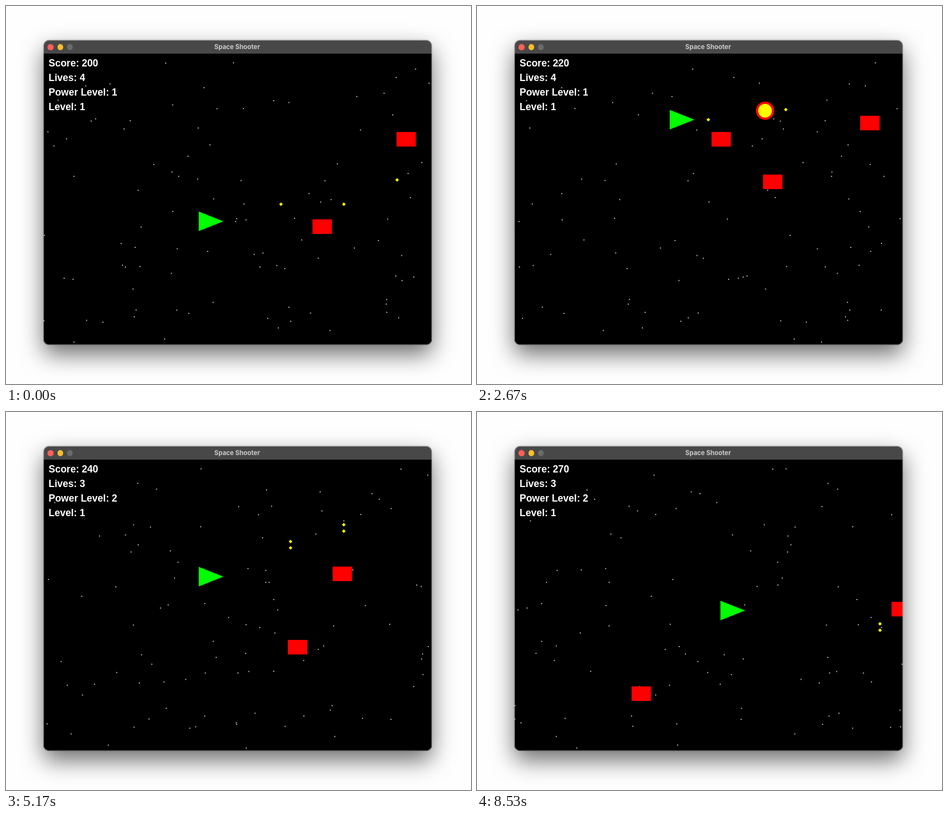
Recreate the animation shown at these times as an HTML page with a canvas. Size 830 by 675 pixels, loop 8.57 s.

```html
<!DOCTYPE html>
<html lang="en">
<head>
<meta charset="utf-8">
<title>Space Shooter</title>
<style>
  html, body { margin: 0; width: 100%; height: 100%; overflow: hidden; background: #fefefe; }
  #win {
    position: absolute; left: 67px; top: 61px; width: 693px; height: 544px;
    border-radius: 10px; background: #484848;
    box-shadow: 0 17px 40px rgba(0, 0, 0, .57), 0 0 2px rgba(0, 0, 0, .5);
  }
  #win::after {
    content: ""; position: absolute; inset: 0;
    border: 1px solid rgba(255, 255, 255, .3); border-radius: 10px;
  }
  #title {
    position: absolute; left: 0; width: 691px; top: 0;
    text-align: center; color: #c9c9c9; font: 700 11.4px/24px Inter, sans-serif;
  }
  i { position: absolute; top: 7px; width: 10.5px; height: 10.5px; border-radius: 50%; }
  canvas { position: absolute; left: 0; top: 24px; border-radius: 0 0 10px 10px; background: #000; }
</style>
</head>
<body>
<div id="win">
  <i style="left:7.3px;background:#ff5f57"></i>
  <i style="left:24.6px;background:#febc2e"></i>
  <i style="left:41.9px;background:#6b6b6b"></i>
  <div id="title">Space Shooter</div>
  <canvas width="693" height="520"></canvas>
</div>
<script>
const ctx = document.querySelector('canvas').getContext('2d');
const LOOP = 8570, LEFT = 67.5, WIDTH = 692, RIGHT = 759;
const SHIP_SPEED = 260, SHOT_SPEED = 522, DROP_SPEED = 153;
const SHIP_LENGTH = 44, ENEMY_W = 34.6, ENEMY_H = 26;
const CRASH = 2.96; // the ship rams an enemy

let seed = 7;
function rand(a, b) {
  seed = (seed * 16807) % 2147483647;
  return a + (b - a) * seed / 2147483647;
}
const stars = Array.from({ length: 97 }, () => ({
  x: rand(0, WIDTH), y: rand(100, 602), speed: rand(52, 154)
}));

// The ship sets off at a given time towards a target, at constant speed
const glide = (from, moves) => t => moves.reduce((pos, [begin, target]) => {
  const reach = SHIP_SPEED * Math.max(0, t - begin);
  return pos + Math.max(-reach, Math.min(reach, target - pos));
}, from);
const shipX = glide(344, [[6.567, 434.5]]);
const shipY = glide(310.5, [
  [-.594, 354], [-.117, 419], [.705, 345.5], [1.4, 185], [2.4, 203], [2.75, 314],
  [3.4, 207], [4.822, 294], [5.8, 289], [7.2, 384], [8.3, 354.5]
]);

// Enemies enter at the right edge: time, top, speed
const enemies = [
  [-1.927, 381, 110], [-.594, 225, 104.4], [.408, 301, 110], [1.08, 174, 206],
  [2.306, 196, 208], [3.362, 407, 141.8], [4.264, 276, 195], [5.2, 277, 170],
  [5.38, 490, 153.2], [6.9, 371, 150], [8.406, 339, 150]
].map(([begin, top, speed]) => ({
  top, end: Infinity, left: t => RIGHT - speed * (t - begin), speed
}));
const rammed = enemies[1], dropper = enemies[4];
rammed.end = CRASH;

// Shots leave the ship's nose and end at the first enemy in their way
const shots = [
  -.594, -.412, -.197, .05, .703, .869, 1.051, 2.144, 2.354, 2.619,
  3.18, 4.755, 4.937, 5.2, 5.7, 5.99, 6.304, 7.6, 8.072
].map(begin => {
  const x = shipX(begin) + SHIP_LENGTH, y = shipY(begin);
  const shot = { begin, x, y, end: Infinity };
  let hit;
  for (const e of enemies) {
    const gap = e.left(begin) - x, time = begin + gap / (SHOT_SPEED + e.speed);
    const inRow = y > e.top && y < e.top + ENEMY_H;
    if (inRow && gap > 0 && e.left(time) < RIGHT && time < Math.min(e.end, shot.end)) {
      hit = e;
      shot.end = time;
    }
  }
  if (hit) hit.end = shot.end;
  return shot;
});

const dropX = t => dropper.left(dropper.end) - DROP_SPEED * (t - dropper.end);
const POWER_UP = dropper.end + (dropX(dropper.end) - shipX(0) - SHIP_LENGTH) / DROP_SPEED;

function rect(color, x, y, w, h) {
  ctx.fillStyle = color;
  ctx.fillRect(x, y, w, h);
}

function poly(color, ...points) {
  ctx.fillStyle = color;
  ctx.beginPath();
  points.forEach(p => ctx.lineTo(...p));
  ctx.fill();
}

function disc(color, x, y, r) {
  ctx.fillStyle = color;
  ctx.beginPath();
  ctx.arc(x, y, r, 0, 7);
  ctx.fill();
}

const diamond = (x, y, r = 3.2) => poly('#ff0', [x - r, y], [x, y - r], [x + r, y], [x, y + r]);

function explosion(e, age) {
  const r = age * 52;
  if (r > 26) return;
  const x = e.left(e.end) + ENEMY_W / 2, y = e.top + ENEMY_H / 2;
  disc('#f00', x, y, r);
  disc('#ff0', x, y, r * .75);
}

function draw(t) {
  ctx.setTransform(1, 0, 0, 1, -67, -85);
  rect('#000', 67, 85, 693, 520);

  for (const s of stars) {
    const x = LEFT + ((s.x - s.speed * t) % WIDTH + WIDTH) % WIDTH;
    rect('#e6e6e6', x - .85, s.y - .85, 1.7, 1.7);
  }

  const x = shipX(t), y = shipY(t);
  poly('#0f0', [x, y - 17.5], [x + SHIP_LENGTH, y], [x, y + 17.5]);

  for (const s of shots) {
    if (t < s.begin || t >= s.end) continue;
    const sx = s.x + SHOT_SPEED * (t - s.begin);
    const offsets = s.begin < POWER_UP ? [0] : [-5.7, 5.7];
    offsets.forEach(d => diamond(sx, s.y + d));
  }

  for (const e of enemies) {
    if (t < e.end) rect('#f00', e.left(t), e.top, ENEMY_W, ENEMY_H);
    else explosion(e, t - e.end);
  }

  if (t >= dropper.end && t < POWER_UP) rect('#ff0', dropX(t), dropper.top + .3, 17.3, 17.3);

  const kills = enemies.filter(e => e !== rammed && t >= e.end).length;
  ctx.fillStyle = '#fff';
  ctx.font = 'bold 17.5px "Liberation Sans", Arial, sans-serif';
  [
    'Score: ' + (200 + 10 * kills),
    'Lives: ' + (t < CRASH ? 4 : 3),
    'Power Level: ' + (t < POWER_UP ? 1 : 2),
    'Level: 1'
  ].forEach((line, i) => ctx.fillText(line, 76, 108 + i * 26));
}

const start = performance.now();
function tick() {
  const ms = (performance.now() - start) % LOOP;
  draw(Math.floor((ms + 4) * .03) / 30); // 30 pictures per second
  requestAnimationFrame(tick);
}
tick();
</script>
</body>
</html>
```
